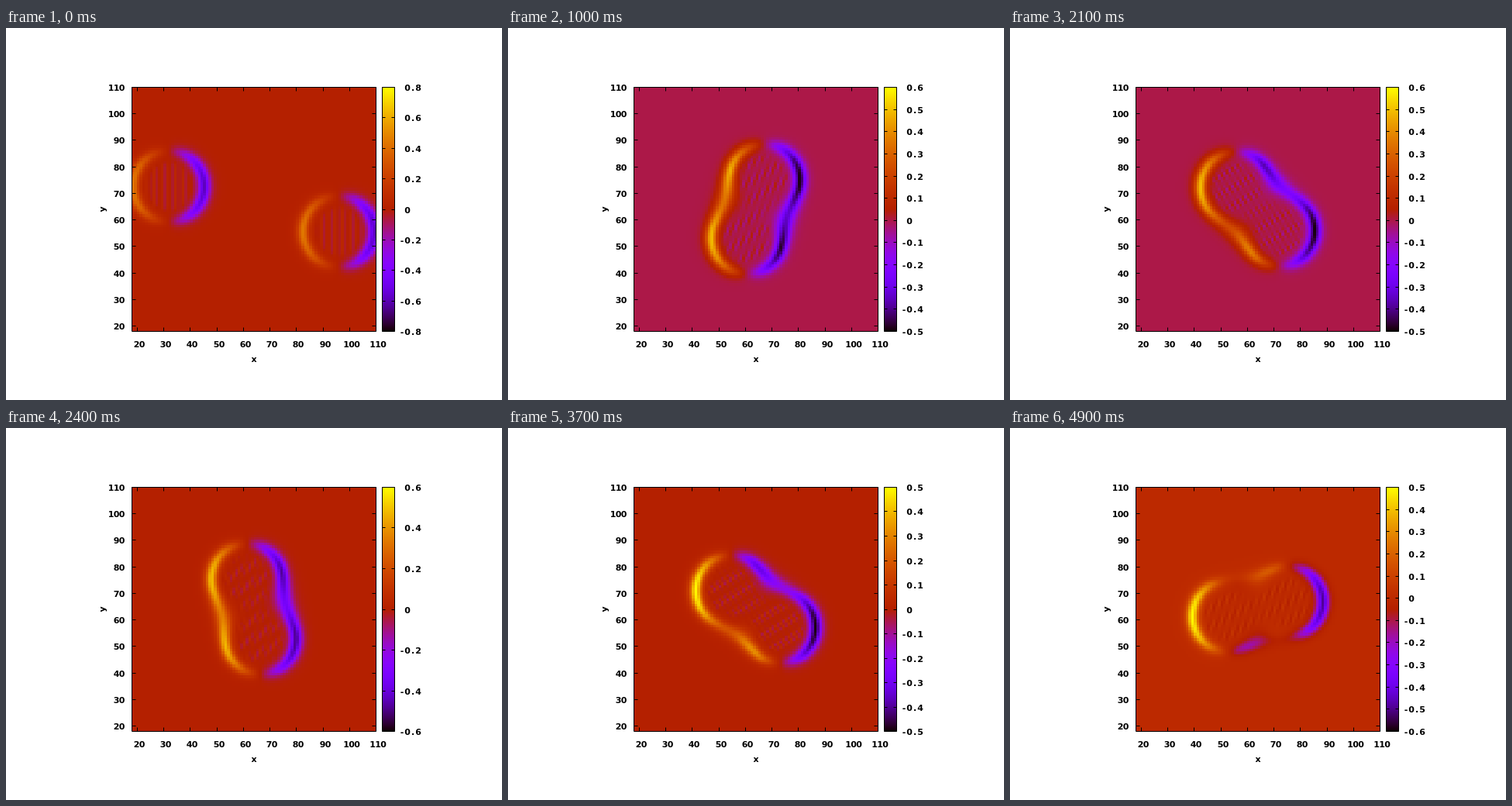
These frames come from a looping animation (640 by 480 pixels, 5000 ms). An HTML page with a canvas:

```html
<!DOCTYPE html>
<html lang="en">
<head>
<meta charset="utf-8">
<title>Two merging bubbles</title>
<style>
  html, body { margin: 0; width: 100%; height: 100%; overflow: hidden; background: #fff; }
  canvas { display: block; width: 640px; height: 480px; }
</style>
</head>
<body>
<canvas id="stage" width="640" height="480"></canvas>
<script>
const ctx = document.getElementById('stage').getContext('2d');
const FRAMES = 50, STEP = 100;
const N = 92, LOW = 18, MID = 64;           // grid cells, axis start, centre of mass
const BOX = { x: 162, y: 76, w: 315, h: 315 };
const BAR = { x: 485, y: 76, w: 16, h: 315 };
const RADIUS = 13.4, WALL = 2, BLEND = 13;

// First step, top and bottom of the colour range
const RANGES = [
  [0, .8, .8], [5, .6, .6], [9, .6, .5], [11, .6, .6], [13, .5, .5], [16, .6, .6],
  [19, .5, .5], [21, .6, .5], [22, .6, .6], [25, .6, .5], [27, .5, .5], [34, .6, .5],
  [35, .5, .5], [40, .6, .6], [43, .6, .5], [45, .5, .5], [49, .5, .6]
];

const grid = document.createElement('canvas');
grid.width = grid.height = N;
const gctx = grid.getContext('2d');
const image = gctx.createImageData(N, N);

const clamp = v => Math.min(1, Math.max(0, v));
const smooth = (a, b, v) => { const u = clamp((v - a) / (b - a)); return u * u * (3 - 2 * u); };

function palette(v) {
  const u = clamp(v);
  return [Math.sqrt(u), u ** 3, Math.max(0, Math.sin(2 * Math.PI * u))].map(c => Math.round(255 * c));
}

// Straight approach that bends into a clockwise orbit
function pose(n) {
  const angle = (-2 - 10.75 * (n - 17)) * Math.PI / 180;
  const s = smooth(3.5, 8, n);
  const mix = (a, b) => a + (b - a) * s;
  return {
    s, angle,
    x: mix(-32 + 4.1 * n, 11.5 * Math.cos(angle)),
    y: mix(8.5, 11.5 * Math.sin(angle))
  };
}

// Signed distance to the softly joined pair of discs
function distance(x, y, p) {
  const a = Math.hypot(x - p.x, y - p.y) - RADIUS;
  const b = Math.hypot(x + p.x, y + p.y) - RADIUS;
  const h = Math.max(BLEND - Math.abs(a - b), 0) / BLEND;
  return Math.min(a, b) - h * h * BLEND / 4;
}

function ripple(x, y, d, n, p) {
  const inside = 1 / (1 + Math.exp(2 * (d + 4.5)));
  const tilt = -1.4 * p.s * Math.sin(2 * p.angle);
  const patch = 1 - .45 * p.s + .45 * p.s * Math.sin(.9 * y - .5 * x + n);
  return .05 * inside * patch * Math.sin(2.3 * x + tilt * y + n);
}

function drawField(n, top, bottom) {
  const p = pose(n);
  const wall = (x, y) => -Math.tanh(distance(x, y, p) / WALL);
  for (let j = 0; j < N; j++) {
    const y = LOW + N - j - .5 - MID;
    for (let i = 0; i < N; i++) {
      const x = LOW + i + .5 - MID;
      let v = wall(x + .5, y) - wall(x - .5, y);
      v *= v < 0 ? 1.2 - .2 * p.s : .9 + .1 * p.s;
      v += ripple(x, y, distance(x, y, p), n, p);
      image.data.set([...palette((v + bottom) / (top + bottom)), 255], 4 * (j * N + i));
    }
  }
  gctx.putImageData(image, 0, 0);
  ctx.imageSmoothingEnabled = false;
  ctx.drawImage(grid, BOX.x, BOX.y, BOX.w, BOX.h);
}

// Fixed-pitch text, 7px per character
function label(text, left, base) {
  [...text].forEach((c, i) => ctx.fillText(c, left + 7 * i + 3.5, base));
}

function tick(x, y, dx, dy) {
  ctx.moveTo(x + .5, y + .5);
  ctx.lineTo(x + dx + .5, y + dy + .5);
}

function frameBox(b) {
  ctx.rect(b.x + .5, b.y + .5, b.w, b.h);
}

function drawAxes() {
  const right = BOX.x + BOX.w, floor = BOX.y + BOX.h;
  ctx.beginPath();
  frameBox(BOX);
  for (let v = 20; v <= 110; v += 10) {
    const off = Math.round((v - LOW) / N * BOX.w);
    const x = BOX.x + off, y = floor - off, text = String(v);
    tick(x, floor, 0, -5);
    tick(x, BOX.y, 0, 5);
    tick(BOX.x, y, 5, 0);
    tick(right, y, -5, 0);
    label(text, x + 3 - 3.5 * text.length, 412);
    label(text, 153 - 7 * text.length, y + 4.5);
  }
  ctx.stroke();
  label('x', 316.5, 431);
  ctx.save();
  ctx.translate(127.5, 234);
  ctx.rotate(-Math.PI / 2);
  label('y', -3.5, 0);
  ctx.restore();
}

function drawBar(top, bottom) {
  const span = top + bottom, step = span > 1.15 ? 2 : 1;
  for (let r = 0; r < BAR.h; r++) {
    ctx.fillStyle = `rgb(${palette(1 - r / BAR.h)})`;
    ctx.fillRect(BAR.x, BAR.y + r, BAR.w, 1);
  }
  ctx.fillStyle = '#000';
  ctx.beginPath();
  frameBox(BAR);
  for (let k = -Math.round(bottom * 10); k <= Math.round(top * 10); k += step) {
    const y = BAR.y + Math.round((top - k / 10) / span * BAR.h);
    tick(BAR.x, y, 4, 0);
    tick(BAR.x + BAR.w, y, -4, 0);
    const text = k ? (k / 10).toFixed(1) : '0';
    label(k < 0 ? text : ' ' + text, 507.5, y + 4.5);
  }
  ctx.stroke();
}

function draw(n) {
  const [, top, bottom] = RANGES.filter(r => r[0] <= n).pop();
  ctx.fillStyle = '#fff';
  ctx.fillRect(0, 0, 640, 480);
  drawField(n, top, bottom);
  ctx.fillStyle = ctx.strokeStyle = '#000';
  ctx.lineWidth = 1;
  ctx.font = 'bold 11px "DejaVu Sans", sans-serif';
  ctx.textAlign = 'center';
  drawAxes();
  drawBar(top, bottom);
}

const start = performance.now();
let shown = -1;
function loop() {
  const n = Math.floor((performance.now() - start) / STEP) % FRAMES;
  if (n !== shown) draw(shown = n);
  requestAnimationFrame(loop);
}
loop();
</script>
</body>
</html>
```
